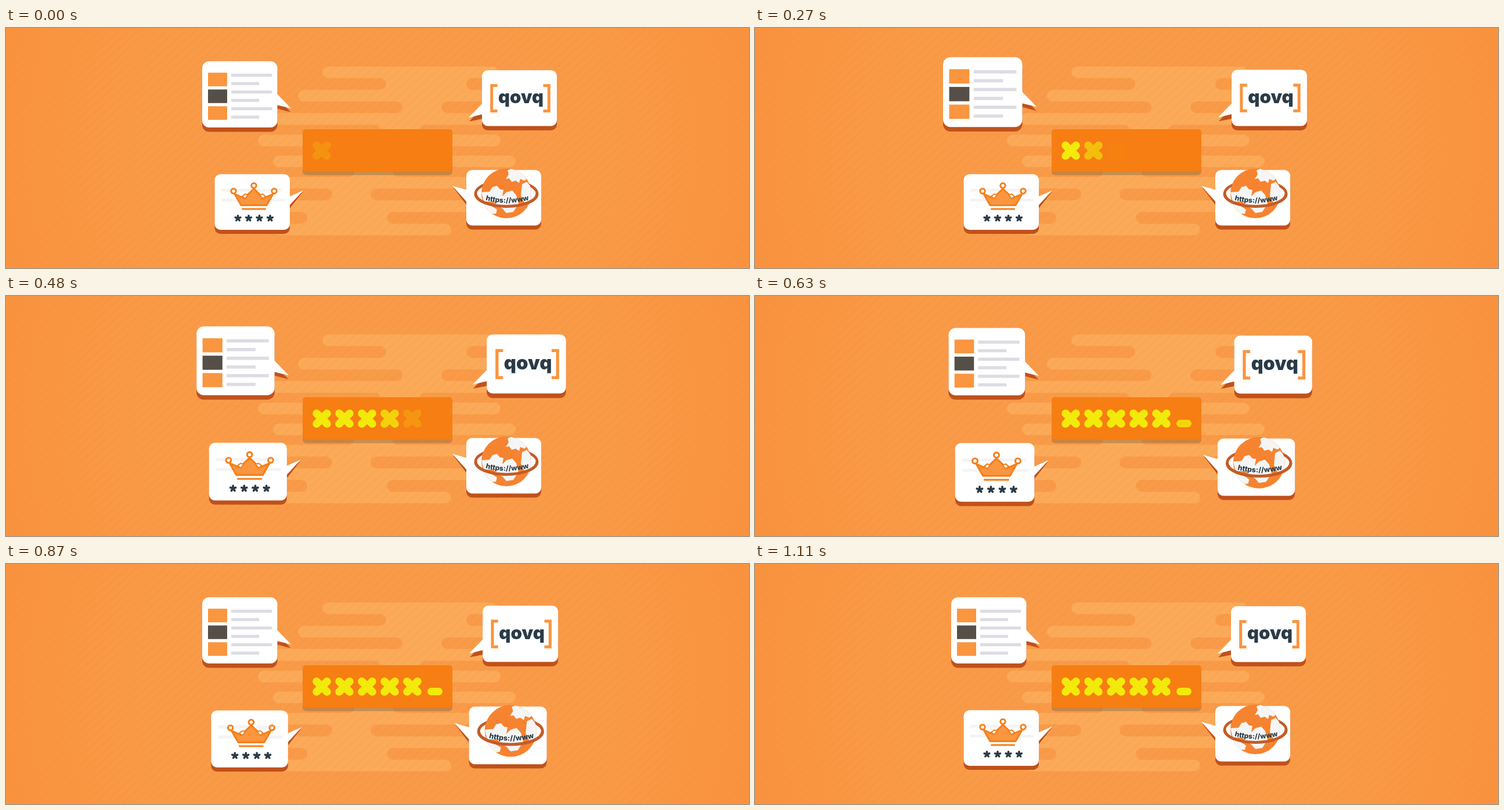
Recreate the animation shown at these times as an HTML page. Size 1280 px wide and 415 px high, loop 2.55 s.

```html
<!DOCTYPE html>
<html lang="en">
<head>
<meta charset="utf-8">
<title>Password bubbles</title>
<style>
html, body { margin: 0; width: 100%; height: 100%; overflow: hidden; background: #f99a46; }
svg { display: block; width: 100%; height: 100%; }
text { font-family: Inter, Roboto, sans-serif; fill: #2a3b47; }
</style>
</head>
<body>
<svg viewBox="0 0 1280 415" preserveAspectRatio="none">
  <defs>
    <radialGradient id="glow" gradientUnits="userSpaceOnUse" cx="640" cy="207" r="680">
      <stop offset="0" stop-color="#f89b4a"/>
      <stop offset=".6" stop-color="#f99a47"/>
      <stop offset="1" stop-color="#fa923f"/>
    </radialGradient>
    <pattern id="stripes" width="11" height="11" patternUnits="userSpaceOnUse" patternTransform="rotate(48)">
      <rect width="4" height="11" fill="#d86a10" opacity=".045"/>
    </pattern>
    <clipPath id="disc"><circle cx="862" cy="286" r="43"/></clipPath>
    <path id="arc" d="M826 297.5Q864 307.5 906 296"/>
    <path id="cross" d="M-9-9L9 9M9-9L-9 9" stroke-width="13.6" stroke-linecap="round"/>
  </defs>

  <rect width="1280" height="415" fill="url(#glow)"/>
  <path id="streaks" fill="#fbaa59"/>
  <rect width="1280" height="415" fill="url(#stripes)"/>

  <g id="list">
    <g fill="#c0511b">
      <rect x="338" y="64.5" width="129.5" height="115" rx="12"/>
      <path d="M466 120L490.500 145.500L466 139Z"/>
    </g>
    <g fill="#fff">
      <rect x="338" y="57.500" width="129.5" height="114.500" rx="12"/>
      <path d="M466 113L491 139L466 133Z"/>
    </g>
    <g id="rows"></g>
  </g>

  <g id="code">
    <g fill="#c0511b">
      <rect x="820" y="80" width="129" height="97" rx="10"/>
      <path d="M821 137L798 161.500L821 157Z"/>
    </g>
    <g fill="#fff">
      <rect x="820" y="73" width="129" height="96.500" rx="10"/>
      <path d="M821 130L797 155L821 149Z"/>
    </g>
    <path d="M846.500 99.500H836.700V143.500H846.500M925.500 99.500H935.300V143.500H925.500" fill="none" stroke="#f9953f" stroke-width="5"/>
    <text x="887" y="130" font-size="31" font-weight="900" text-anchor="middle">qovq</text>
  </g>

  <g id="crown">
    <g fill="#c0511b">
      <rect x="359.500" y="260" width="129.500" height="96" rx="10"/>
      <path d="M488 299L511.500 283L488 313Z"/>
    </g>
    <g fill="#fff">
      <rect x="359.500" y="252.700" width="129.500" height="96.300" rx="10"/>
      <path d="M488 291.500L512 281L488 307Z"/>
    </g>
    <path d="M371 280.500H476M371 297.500H480" stroke="#f5f4f5" stroke-width="5"/>
    <g stroke="#f57f1a" stroke-width="3" stroke-linejoin="round" stroke-linecap="round">
      <path d="M394 287L410 294L427 278L444 294L460 287L449 306.500H405Z" fill="#f9963f"/>
      <path d="M407 291L412 287L417 289L412 295ZM447 291L442 287L437 289L442 295Z" fill="#fff" stroke-width="2"/>
      <path d="M407.500 313H446.500"/>
      <g fill="#fff">
        <circle cx="392" cy="282" r="4.200"/>
        <circle cx="427" cy="272.500" r="4.200"/>
        <circle cx="462" cy="282" r="4.200"/>
      </g>
    </g>
    <path id="stars" stroke="#2a3b47" stroke-width="3.500" stroke-linecap="round"/>
  </g>

  <g id="globe">
    <g fill="#c0511b">
      <rect x="793" y="252.500" width="129" height="96" rx="10"/>
      <path d="M794 287L770 275L794 307Z"/>
    </g>
    <g fill="#fff">
      <rect x="793" y="245.500" width="129" height="96" rx="10"/>
      <path d="M794 280L769 273L794 301Z"/>
    </g>
    <ellipse cx="862" cy="286.500" rx="53" ry="22" fill="none" stroke="#c45b28" stroke-width="4.500"/>
    <circle cx="862" cy="286" r="43" fill="#f68330"/>
    <g clip-path="url(#disc)" fill="#f5f5f5">
      <path d="M864 246L872 243L884 246L892 252L898 260L893 264L886 261L884 268L878 264L871 266L867 260L861 261L866 253Z"/>
      <path d="M889 270L897 266L907 278L906 302L893 302L887 290Z"/>
      <path d="M819 284L833 283L838 275L846 273L851 279L857 280L855 291L862 284L872 281L879 289L883 304L874 318L862 320L855 312L846 308L840 300L823 300Z"/>
      <path d="M818 304L834 306L846 314L844 321L832 322L848 332H818Z"/>
    </g>
    <path d="M809 286.500A53 22 0 0 0 915 286.500" fill="none" stroke="#c45b28" stroke-width="5"/>
    <text font-size="12" font-weight="800"><textPath href="#arc">https://www</textPath></text>
  </g>

  <rect x="511" y="182" width="258" height="72.500" rx="6" fill="#7a6440" opacity=".4"/>
  <rect x="511" y="175" width="258" height="73.500" rx="5" fill="#f77e12"/>
  <g id="typed" fill="#f2ea0a" stroke="#f2ea0a">
    <use href="#cross" x="544" y="212"/>
    <use href="#cross" x="583" y="212"/>
    <use href="#cross" x="622" y="212"/>
    <use href="#cross" x="661" y="212"/>
    <use href="#cross" x="700" y="212"/>
    <rect x="726" y="214" width="26" height="13" rx="6.500" stroke="none"/>
  </g>
</svg>
<script>
const $ = id => document.getElementById(id);
const LOOP = 2550, STEP = 30;

// Streaks: rounded pills alternating with rows cut in from both sides.
const pill = (x1, x2, y, h) => {
  const r = h / 2;
  return `M${x1 + r} ${y}H${x2 - r}a${r} ${r} 0 0 1 0 ${h}H${x1 + r}a${r} ${r} 0 0 1 0 ${-h}Z`;
};
const waist = (x1, x2, y, h) => {
  const r = h / 2;
  return `M${x1 - r} ${y}a${r} ${r} 0 0 1 0 ${h}H${x2 + r}a${r} ${r} 0 0 1 0 ${-h}Z`;
};
const bands = [
  [545, 848, 66.5], [655, 793, 86.5], [503, 850, 107], [683, 750, 127],
  [458, 835, 147], [645, 713, 167.5], [434, 852, 184.5], [620, 690, 204.5],
  [460, 878, 220.5], [600, 666, 240.5], [468, 815, 257.5], [562, 628, 277.5],
  [470, 810, 298], [519, 656, 318], [465, 767, 338.5], [0, 0, 358.5]
];
$("streaks").setAttribute("d", bands.slice(0, -1).map(([a, b, y], i) =>
  (i % 2 ? waist : pill)(a, b, y, bands[i + 1][2] - y)).join(""));

const bar = (x, y, w, h, fill) => `<rect x="${x}" y="${y}" width="${w}" height="${h}" fill="${fill}"/>`;
$("rows").innerHTML = ["#f9963f", "#554f47", "#f9963f"].map((fill, i) => {
  const y = 77.3 + 29 * i;
  return bar(348, y, 33, 23.5, fill) + bar(388, y + 1.7, 70, 5.3, "#dddce4") + bar(388, y + 16.2, 48, 5.3, "#dddce4");
}).join("");

let stars = "";
for (let i = 0; i < 4; i++)
  for (let k = 0; k < 5; k++) {
    const a = (k * 72 - 90) * Math.PI / 180;
    stars += `M${399.5 + 18.5 * i} 329l${(4.6 * Math.cos(a)).toFixed(2)} ${(4.6 * Math.sin(a)).toFixed(2)}`;
  }
$("stars").setAttribute("d", stars);

// Each bubble swells away from (x, y): start, peak and end times.
const bubbles = [
  { el: $("list"), x: 596, y: 188, zoom: .062, times: [30, 304, 757] },
  { el: $("code"), x: 682, y: 185, zoom: .06, times: [240, 484, 930] },
  { el: $("crown"), x: 627, y: 225, zoom: .06, times: [300, 594, 1040] },
  { el: $("globe"), x: 675, y: 218, zoom: .06, times: [495, 740, 1110] }
];
// Fade-in start and length of each typed mark.
const fades = [[-48, 240], [150, 200], [265, 190], [335, 185], [440, 185], [535, 118]];
const marks = [...$("typed").children];

const clamp = v => Math.max(0, Math.min(1, v));

function draw(t) {
  for (const { el, x, y, zoom, times: [start, peak, end] } of bubbles) {
    const p = clamp(Math.min((t - start) / (peak - start), (end - t) / (end - peak)));
    el.setAttribute("transform", `translate(${x} ${y}) scale(${1 + zoom * p}) translate(${-x} ${-y})`);
  }
  marks.forEach((mark, i) => mark.setAttribute("opacity", clamp((t - fades[i][0]) / fades[i][1])));
}

let begin;
function tick(now) {
  begin ??= now;
  draw(Math.floor((now - begin) % LOOP / STEP) * STEP);
  requestAnimationFrame(tick);
}
draw(0);
requestAnimationFrame(tick);
</script>
</body>
</html>
```
